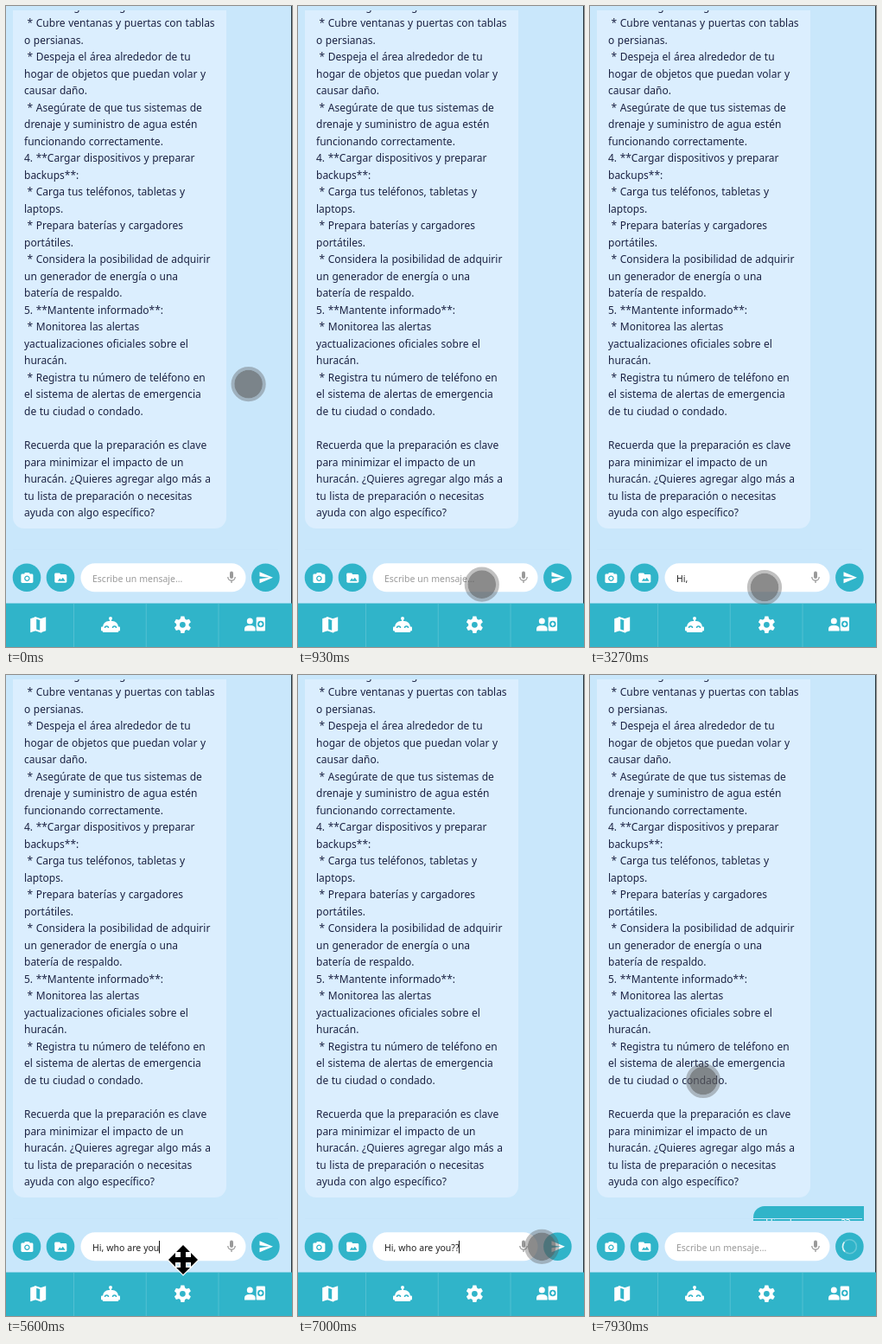
Write an HTML page that moves like this. It is 331x741 px and loops after 8 s.

```html
<!DOCTYPE html>
<html lang="es">
<head>
<meta charset="utf-8">
<style>
html, body { margin: 0; width: 100%; height: 100%; overflow: hidden; background: #c9e7fb; }
svg { display: block; width: 331px; height: 741px; }
text { font-family: "Noto Sans", "Open Sans", sans-serif; white-space: pre; }
.msg { font-size: 12px; word-spacing: .45px; fill: #1b2243; }
.field { font-size: 10.5px; word-spacing: .2px; }
</style>
</head>
<body>
<svg viewBox="0 0 331 741">
  <defs>
    <clipPath id="scroll"><rect y="5" width="330" height="626"/></clipPath>
  </defs>
  <rect width="331" height="741" fill="#c9e7fb"/>
  <g clip-path="url(#scroll)">
    <rect x="8" y="-40" width="247" height="644" rx="13" fill="#dbeefe"/>
    <g id="lines" class="msg"></g>
    <g id="reply">
      <path d="M189 640V627a13 13 0 0 1 13-13H317V640Z" fill="#30b4c9"/>
      <text x="203" y="638" font-size="12" fill="#fff">Hi, who are you??</text>
    </g>
  </g>
  <path d="M8 628.5H315" stroke="#c6e5fa"/>
  <path d="M330.5 0V691" stroke="#24343c"/>

  <g fill="#30b4c9">
    <circle cx="24" cy="660.7" r="16.3"/>
    <circle cx="63" cy="660.7" r="16.3"/>
    <circle cx="300.4" cy="660.7" r="16.3"/>
    <rect y="690.5" width="331" height="51"/>
  </g>
  <g id="dividers" stroke="#52c0d2"></g>
  <rect x="86.5" y="644.3" width="191" height="33" rx="16.5" fill="#fff"/>

  <g id="camera" transform="translate(24.4 661)" fill="#fff">
    <rect x="-7" y="-4.500" width="14" height="10.500" rx="1.400"/>
    <rect x="-3" y="-6" width="6" height="3" rx="1"/>
    <circle cy=".7" r="2.600" fill="none" stroke="#30b4c9" stroke-width="1.300"/>
  </g>
  <g id="picture" transform="translate(63.3 661)" fill="#fff">
    <rect x="-7" y="-4" width="14" height="9.700" rx="1.400"/>
    <rect x="-7" y="-5.600" width="6.500" height="4" rx="1.200"/>
    <path d="M-3.500 3.700L-1 .5L.5 2.200L2.500 -.3L5.300 3.700Z" fill="#30b4c9"/>
  </g>
  <path id="send" transform="translate(301 660.7)" d="M-7.500 6.500L8 0L-7.500 -6.500V-1.500L3.500 0L-7.500 1.500Z" fill="#fff"/>
  <g id="spin" fill="none" stroke="#fff" stroke-width="1.600">
    <circle r="8" opacity=".25"/>
    <path d="M0-8A8 8 0 0 1 8 0" opacity=".8"/>
  </g>
  <g id="mic" transform="translate(261 660)">
    <rect x="-2" y="-6.500" width="4" height="8.500" rx="2" fill="#999"/>
    <path d="M-4.200 0A4.200 4.200 0 0 0 4.200 0M0 4V7" fill="none" stroke="#999" stroke-width="1.300"/>
  </g>

  <g id="map" transform="translate(37.2 715.300)" fill="#fff">
    <path d="M-9 -7L-3 -9V7L-9 9ZM3 -7L9 -9V7L3 9Z"/>
    <path d="M-3 -8L3 -6V8L-3 6Z" fill="none" stroke="#fff" stroke-width="2"/>
  </g>
  <g id="robot" transform="translate(121 715)" fill="#fff">
    <circle cy="-7" r="2"/>
    <rect x="-1" y="-7" width="2" height="5"/>
    <path d="M-9 9V3A7 7 0 0 1 -2 -4H2A7 7 0 0 1 9 3V9Z"/>
    <rect x="-11" y="2.500" width="22" height="5" rx="1"/>
    <path d="M-6.500 4a2 2 0 0 1 4 0M2.500 4a2 2 0 0 1 4 0" fill="none" stroke="#30b4c9" stroke-width="1.500"/>
  </g>
  <g id="gear" transform="translate(204.400 715.300)" fill="#fff">
    <circle r="5.300" fill="none" stroke="#fff" stroke-width="3.800"/>
  </g>
  <g id="contact" transform="translate(288 715)" fill="#fff">
    <circle cx="-5.700" cy="-4" r="3.500"/>
    <path d="M-12 7.500V5Q-12 1-5.700 1T.6 5V7.500Z"/>
    <rect x="1.700" y="-8.500" width="10.300" height="16" rx="1"/>
    <circle cx="6.800" cy="-.5" r="3.800" fill="#30b4c9"/>
    <path d="M6.800 -3L9 -.5L6.800 2L4.600 -.5Z"/>
  </g>

  <text id="hint" class="field" x="100" y="665.500" fill="#9a9a9a">Escribe un mensaje...</text>
  <text id="typed" class="field" x="100" y="665.500" fill="#222"></text>
  <path id="caret" d="M.5 654V668.500" stroke="#111"/>

  <g id="touch">
    <circle r="18.200" fill="none" stroke="#5a5a5a" stroke-opacity=".38" stroke-width="3.800"/>
    <circle r="16.300" fill="#5a5a5a" fill-opacity=".7"/>
  </g>
  <g id="move" transform="translate(205 676)" stroke="#fff" stroke-width="2.400" paint-order="stroke"></g>
</svg>
<script>
const LOOP = 8000, FOCUS = 1730, SENT = 7470, BLINK = 465;
const $ = id => document.getElementById(id);
const show = (el, on) => el.setAttribute('visibility', on ? 'visible' : 'hidden');

function add(parent, tag, attrs) {
  const el = document.createElementNS('http://www.w3.org/2000/svg', tag);
  for (const name in attrs) el.setAttribute(name, attrs[name]);
  return $(parent).appendChild(el);
}

const message = `3. **Proteger tu hogar**:
 * Cubre ventanas y puertas con tablas
o persianas.
 * Despeja el área alrededor de tu
hogar de objetos que puedan volar y
causar daño.
 * Asegúrate de que tus sistemas de
drenaje y suministro de agua estén
funcionando correctamente.
4. **Cargar dispositivos y preparar
backups**:
 * Carga tus teléfonos, tabletas y
laptops.
 * Prepara baterías y cargadores
portátiles.
 * Considera la posibilidad de adquirir
un generador de energía o una
batería de respaldo.
5. **Mantente informado**:
 * Monitorea las alertas
yactualizaciones oficiales sobre el
huracán.
 * Registra tu número de teléfono en
el sistema de alertas de emergencia
de tu ciudad o condado.

Recuerda que la preparación es clave
para minimizar el impacto de un
huracán. ¿Quieres agregar algo más a
tu lista de preparación o necesitas
ayuda con algo específico?`;

message.split('\n').forEach((line, i) => {
  add('lines', 'text', { x: 21, y: Math.round(4.5 + 19.52 * i) }).textContent = line;
});
for (let i = 0; i < 3; i++) {
  const x = 78.5 + 83.75 * i;
  add('dividers', 'path', { d: `M${x} 691V741` });
}
for (let i = 0; i < 6; i++) {
  add('gear', 'path', { d: 'M-3 -5.5L-2 -9.8H2L3 -5.5Z', transform: `rotate(${60 * i})` });
}
for (let i = 0; i < 4; i++) {
  add('move', 'path', { d: 'M0 -17L8 -9H3V0H-3V-9H-8Z', transform: `rotate(${90 * i})` });
}
add('move', 'path', { d: 'M-3 -8H3V8H-3ZM-8 -3H8V3H-8Z', stroke: 'none' });

// Pointer strokes: curves from one resting point to the next
const linear = u => u;
const easeOut = u => 1 - (1 - u) ** 2;
const easeInOut = u => u * u * (3 - 2 * u);
const strokes = [
  { start: 0, end: 410, from: [281, 438], bend: [203, 255], to: [124, 249], ease: linear },
  { start: 410, end: 820, from: [124, 249], bend: [125, 480], to: [202, 721], ease: easeInOut },
  { start: 820, end: 1270, from: [202, 721], bend: [224, 633], to: [202, 672], ease: easeOut },
  { start: 6500, end: 6750, from: [202, 672], bend: [176, 688], to: [200, 701], ease: linear },
  { start: 6750, end: 7330, from: [200, 701], bend: [284, 648], to: [299, 664], ease: easeOut },
  { start: 7450, end: 7930, from: [299, 664], bend: [215, 540], to: [131, 469], ease: easeInOut }
];

function pointAt(t) {
  const s = strokes.filter(s => t >= s.start).pop();
  const u = s.ease(Math.min(1, (t - s.start) / (s.end - s.start))), v = 1 - u;
  return s.from.map((a, k) => v * v * a + 2 * u * v * s.bend[k] + u * u * s.to[k]);
}

// Each burst of typing is spread evenly between its first and last key
const bursts = [
  { text: 'Hi, ', first: 2130, last: 2800 },
  { text: 'who are ', first: 3730, last: 4470 },
  { text: 'you', first: 5070, last: 5330 },
  { text: '??', first: 5930, last: 6070 }
];
const keys = bursts.flatMap(({ text, first, last }) => [...text].map((char, i) =>
  ({ char, time: first + (last - first) * i / (text.length - 1) })));

function draw(t) {
  const sent = t >= SENT;
  const pressed = sent ? [] : keys.filter(k => t >= k.time);
  const typed = $('typed');
  typed.textContent = pressed.map(k => k.char).join('');
  show($('hint'), !pressed.length);

  const x = 100 + (pressed.length ? typed.getComputedTextLength() : 0);
  const idle = t - (pressed.length ? pressed[pressed.length - 1].time : FOCUS);
  $('caret').setAttribute('transform', `translate(${Math.round(x)} 0)`);
  show($('caret'), idle >= 0 && !sent && Math.floor(idle / BLINK) % 2 === 0);

  show($('reply'), sent);
  show($('send'), !sent);
  show($('spin'), sent);
  $('spin').setAttribute('transform', `translate(300.4 660.7) rotate(${(t - SENT) * .48})`);

  const moving = t >= 5600 && t < 5870;
  show($('move'), moving);
  show($('touch'), !moving);
  $('touch').setAttribute('transform', `translate(${pointAt(t)})`);
}

function tick() {
  draw(performance.now() % LOOP);
  requestAnimationFrame(tick);
}
tick();
</script>
</body>
</html>
```
